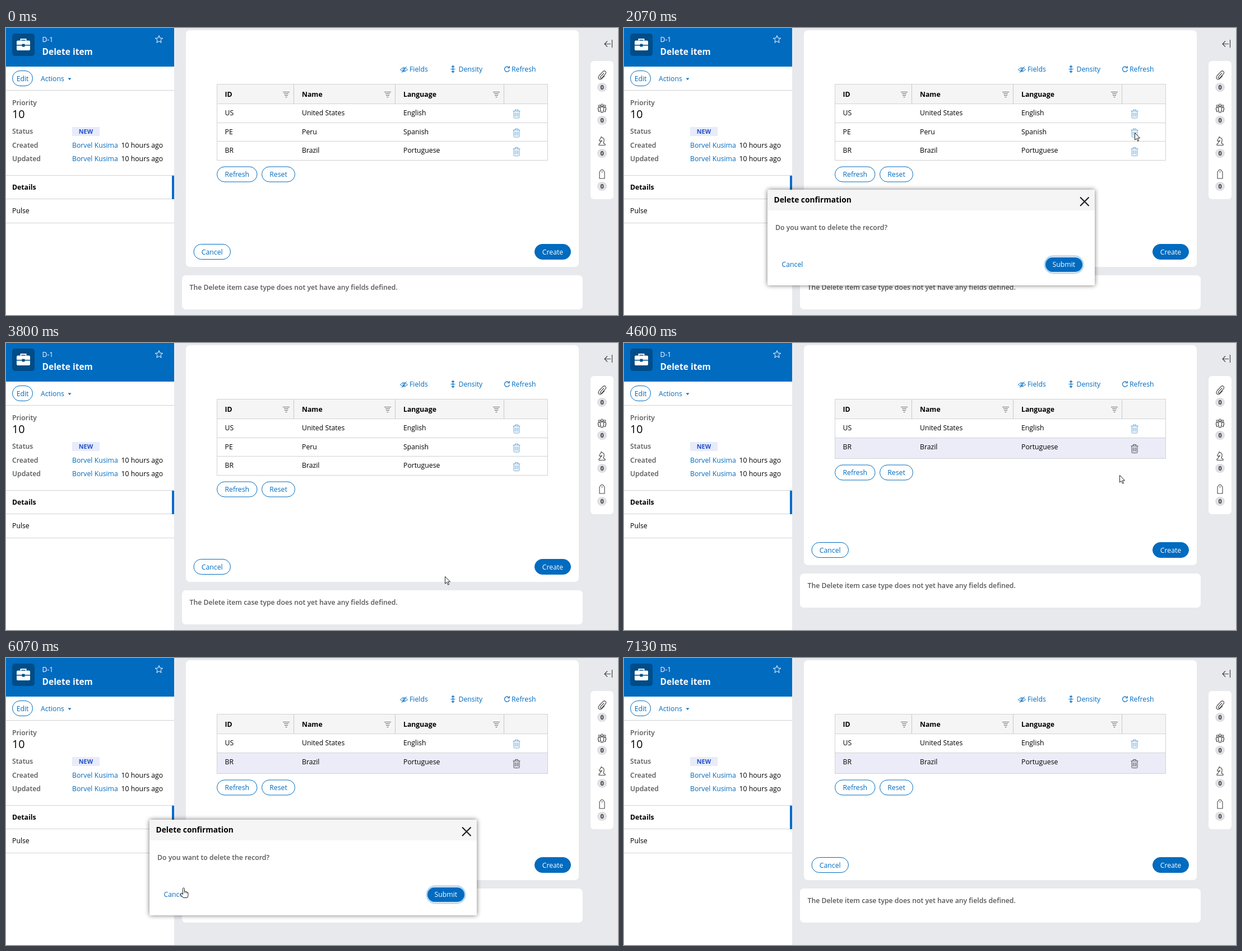
Recreate the animation shown at these times as an HTML page. Size 1092 by 513 pixels, loop 7590 ms.

```html
<!DOCTYPE html>
<html lang="en">
<head>
<meta charset="utf-8">
<title>Delete item</title>
<style>
  html, body { margin: 0; width: 100%; height: 100%; overflow: hidden; background: #e8e9ed; }
  svg { display: block; width: 100vw; height: 100vh; font: 12.25px "Open Sans", sans-serif; }
</style>
</head>
<body>
<svg id="stage" viewBox="0 0 1092 513"></svg>
<script>
const LOOP = 7590;
const BLUE = '#006bbf', INK = '#000', GREY = '#595959', LINE = '#d1d2d5';

// Drawing helpers
const text = (x, y, s, fill = INK, weight = 400, size = 12.25, anchor = 'start') =>
  `<text x="${x}" y="${y}" fill="${fill}" font-weight="${weight}" font-size="${size}" text-anchor="${anchor}">${s}</text>`;
const rect = (x, y, w, h, fill, r = 0, more = '') =>
  `<rect x="${x}" y="${y}" width="${w}" height="${h}" rx="${r}" fill="${fill}" ${more}/>`;
const line = (d, stroke, width = 1, more = '') =>
  `<path d="${d}" fill="none" stroke="${stroke}" stroke-width="${width}" ${more}/>`;
const group = (x, y, body, id = '') =>
  `<g ${id && `id="${id}"`} transform="translate(${x} ${y})">${body}</g>`;
const pill = (x, y, w, label, solid) =>
  rect(x + .5, y + .5, w - 1, 27, solid ? BLUE : '#fff', 13.5, `stroke="${BLUE}"`) +
  text(x + w / 2, y + 18.5, label, solid ? '#fff' : BLUE, 400, 12.25, 'middle');

const trash = (x, y, color) => group(x, y, line(
  'M-6.5 -5H6.5M-2.5 -5V-7.5H2.5V-5M-5 -5V6.2Q-5 7.5 -3.7 7.5H3.7Q5 7.5 5 6.2V-5M-2.5 -2.5V5M0 -2.5V5M2.5 -2.5V5', color));
const filter = x => line(`M${x - 6} 114.5h12M${x - 4} 117.5h8M${x - 3} 120.5h6M${x - 1.5} 123.5h3`, '#6b6b6b');

function sidebar() {
  const user = 'Borvel Kusima';
  const star = Array.from({ length: 10 }, (_, i) => {
    const a = i * Math.PI / 5, r = i % 2 ? 3.1 : 7;
    return `${(273 + r * Math.sin(a)).toFixed(1)} ${(20.5 - r * Math.cos(a)).toFixed(1)}`;
  }).join('L');
  return rect(0, 0, 300, 513, '#fff') + rect(0, 0, 300, 69, BLUE) +
    rect(11, 10, 40, 40, '#004c87', 5) +
    '<path d="M21 22.5H41Q43 22.5 43 24.5V30H33.5V28.5H28.5V30H19V24.5Q19 22.5 21 22.5ZM19 31.5H28.5V33.5H33.5V31.5H43V38Q43 40 41 40H21Q19 40 19 38Z" fill="#fff"/>' +
    line('M26.5 22.5V20H35.5V22.5', '#fff', 2) +
    text(64.5, 25, 'D-1', '#fff') + text(64.5, 48, 'Delete item', '#fff', 700, 15.5) +
    line(`M${star}Z`, '#fff', 1, 'stroke-linejoin="round"') +
    pill(11, 76, 37, 'Edit') + text(62, 95, 'Actions', BLUE) +
    `<path d="M110.5 89.5h6l-3 3.5z" fill="${BLUE}"/>` +
    line('M0 111.5H300M0 263.5H300M0 305.5H300M0 348.5H300', LINE) +
    text(11, 138, 'Priority', GREY, 600) + text(11, 161, '10', INK, 400, 19.6) +
    text(11, 189, 'Status', GREY, 600) + rect(118, 177, 49, 16, '#e7ebfa') +
    text(142.5, 189, 'NEW', '#2450c8', 700, 10.9, 'middle') +
    [['Created', 214], ['Updated', 238]].map(([label, y]) =>
      text(11, y, label, GREY, 600) + text(118, y, user, BLUE) + text(205.5, y, '10 hours ago')).join('') +
    text(11, 289, 'Details', INK, 700) + text(11, 331, 'Pulse') +
    rect(296, 264, 4, 42, '#076bc9');
}

function rail() {
  const ink = '#444';
  const icons = [
    'M3.5 -3.5L-2.5 2.8Q-4 4.8 -2.6 5.6Q-1.4 6.4 0 4.8L6 -1.8Q8.2 -4.8 6 -6.6Q3.8 -8.4 1.2 -5.6L-5 1Q-8 4.8 -5.2 7.2Q-2.6 9 0 6.2L4.5 1.5',
    'M-2 -5a2 2 0 1 0 4 0a2 2 0 1 0 -4 0M-6.5 -3.5a1.7 1.7 0 1 0 3.4 0a1.7 1.7 0 1 0 -3.4 0M3.1 -3.5a1.7 1.7 0 1 0 3.4 0a1.7 1.7 0 1 0 -3.4 0M-3 5V0Q-3 -2 0 -2Q3 -2 3 0V5H1.8V8H-1.8V5ZM-4 -.5H-7V3.5H-6V6.5H-3.5M4 -.5H7V3.5H6V6.5H3.5',
    'M-5.5 7.5V5.5L-3.5 4Q-3 1.5 0 -.8L-3.8 .5L-5 -1.2L-2 -5.5L-1.5 -7.5L.5 -6Q4.5 -4.5 3.5 0L2.5 4L5.5 5.5V7.5Z',
    'M-4.5 8V-3.5L-1.5 -7.5H1.5L4.5 -3.5V8ZM0 -5V-2.5'
  ];
  return line('M1081.5 21V35M1079 28.5H1068M1073 23.5L1068 28.5L1073 33.5', ink, 1.2) +
    rect(1043, 59, 41, 247, '#fff', 6) +
    icons.map((d, i) => group(1063.5, 84 + 59 * i, line(d, ink, 1.1, 'stroke-linejoin="round"') +
      rect(-8.5, 14, 17, 16, '#dedfe3', 8) +
      text(0, 26, '0', '#333', 700, 10.9, 'middle'))).join('');
}

const cells = (y, ...words) => words.map((w, i) => text([390.5, 528, 709][i], y, w)).join('');

function table() {
  const tools = line('M703.5 74.5Q710 67 716.5 74.5Q710 81 703.5 74.5ZM706 80L714.5 69', BLUE) +
    `<circle cx="710" cy="74.5" r="2" fill="none" stroke="${BLUE}"/>` +
    line('M797.5 67.5V79.5M795 70L797.5 67.5L800 70M795 77L797.5 79.5L800 77M793.5 73.5H801.5', BLUE, 1.1) +
    line('M897 70.2A4.5 4.5 0 1 0 898.5 74.5M898.3 68V71.5H894.8', BLUE, 1.2) +
    text(720, 78, 'Fields', BLUE) + text(807.5, 78, 'Density', BLUE) + text(902, 78, 'Refresh', BLUE);
  const heads = ['ID', 'Name', 'Language'].map((w, i) =>
    text([390.5, 528, 709][i], 122.5, w, INK, 700) + filter([500, 681, 875][i])).join('');
  return tools + rect(376, 100, 590, 35, '#f5f5f5') +
    line('M513.5 100V135M694.5 100V135M888.5 100V135', '#c6c7ca') + heads +
    cells(156, 'US', 'United States', 'English') + trash(911, 153.5, '#69a8da') +
    `<g id="full">${cells(189.5, 'PE', 'Peru', 'Spanish')}${trash(911, 187.5, '#69a8da')}
      ${cells(223, 'BR', 'Brazil', 'Portuguese')}${trash(911, 221, '#69a8da')}
      ${line('M376 202.5H966', LINE)}${rect(376.5, 100.5, 590, 136, 'none', 0, `stroke="${LINE}"`)}</g>` +
    `<g id="short">${rect(376, 169, 590, 37, '#ebecf7')}${cells(190, 'BR', 'Brazil', 'Portuguese')}
      ${trash(911, 189, '#4a4b52')}${rect(376.5, 100.5, 590, 106, 'none', 0, `stroke="${LINE}"`)}</g>` +
    line('M376 135.5H966M376 169.5H966', LINE);
}

function dialog() {
  const halo = (id, x, w) => `<g id="${id}">${rect(x - 1, 408, w + 2, 30, '#1b7fd6', 15, 'filter="url(#glow)"')}
    ${rect(x - .5, 408.5, w + 1, 29, '#fff', 14.5)}</g>`;
  return rect(256, 289, 584, 171, '#000', 2, 'opacity=".55" filter="url(#shade)"') +
    rect(256, 289, 584, 171, '#fff', 2) + rect(256, 289, 584, 37, '#f5f5f5', 2) +
    text(267.5, 312, 'Delete confirmation', INK, 700, 13.78) +
    line('M814 302.5L829.5 318M829.5 302.5L814 318', '#15161f', 2) +
    text(270, 361, 'Do you want to delete the record?', GREY, 600) +
    halo('cancelRing', 268, 65) + text(300.5, 427, 'Cancel', BLUE, 400, 12.25, 'middle') +
    halo('submitRing', 752, 66) + rect(752, 410, 66, 26, BLUE, 13) +
    text(784.8, 427, 'Submit', '#fff', 400, 12.25, 'middle');
}

const outline = 'fill="#fff" stroke="#222" stroke-width="1" stroke-linejoin="round"';
const arrow = `<path id="arrow" d="M.5 .5V13.2L3.4 10.6L5.7 15.3L7.6 14.4L5.4 9.8H9.6Z" ${outline}/>`;
const hand = `<g id="hand"><path d="M-1.5 7V-2.5Q-1.5 -4 0 -4T1.5 -2.5V2Q3.6 1.2 4 2.8Q5.8 2.2 6.2 3.8Q8 3.4 8 5.4V8.5Q8 11 6.5 13.5H-1L-5.3 7.6Q-6 6 -4.6 5.6Q-3.2 5.4 -1.5 7.5Z" ${outline}/>
  ${line('M1.5 2V5M4 2.8V5.5M6.2 3.8V6', '#222', .8)}</g>`;

const stage = document.getElementById('stage');
stage.innerHTML = `<defs>
  <filter id="glow" x="-20%" y="-40%" width="140%" height="180%"><feGaussianBlur stdDeviation="1.5"/></filter>
  <filter id="shade" x="-5%" y="-15%" width="110%" height="130%"><feGaussianBlur stdDeviation="4"/></filter>
  </defs>` +
  rect(0, 0, 1092, 513, '#e8e9ed') + sidebar() + rail() +
  rect(321, 4, 701, 380, '#fff', 7) +
  group(0, 0, rect(321, 340, 701, 87, '#fff', 7) + rect(314, 442, 715, 61, '#fff', 7) +
    pill(376, 247.5, 72.5, 'Refresh') + pill(456, 247.5, 60, 'Reset') +
    pill(334.5, 386, 66.5, 'Cancel') + pill(943, 386, 65, 'Create', true) +
    text(327.5, 468, 'The Delete item case type does not yet have any fields defined.', GREY, 600), 'below') +
  table() + `<g id="dialog">${dialog()}</g>` + group(0, 0, arrow + hand, 'cursor');

const el = id => document.getElementById(id);
const [below, full, short, box, cancelRing, submitRing, cursor, arrowEl, handEl] =
  ['below', 'full', 'short', 'dialog', 'cancelRing', 'submitRing', 'cursor', 'arrow', 'hand'].map(el);
const show = (node, on) => node.setAttribute('visibility', on ? 'inherit' : 'hidden');
const clamp = v => Math.max(0, Math.min(1, v));

// Pointer moves: start, duration, from, to
const moves = [
  [600, 1130, [1094, 520], [911, 187]],
  [2333, 1170, [911, 187], [783, 417]],
  [4133, 867, [783, 417], [911, 187]],
  [5150, 1070, [911, 187], [305, 420]],
  [6600, 1170, [305, 420], [-32, 553]]
];

function pointer(t) {
  const [start, span, a, b] = moves.filter(m => m[0] <= t).pop() || moves[0];
  const p = 1 - (1 - clamp((t - start) / span)) ** 2;
  return a.map((v, i) => v + (b[i] - v) * p);
}

const inside = (x, y, l, t, r, b) => x >= l && x <= r && y >= t && y <= b;

function render(ms) {
  const t = Math.round(Math.floor((ms + 4) * 15 / 1000) * 20 / 3) * 10;
  const first = t >= 2000 && t < 3600, second = t >= 5200 && t < 6470;
  const open = first || second, removed = t >= 3870;

  show(full, !removed);
  show(short, removed);
  below.setAttribute('transform', `translate(0 ${removed ? -30 : 0})`);

  show(box, open);
  const moved = clamp((t - 6130) / 130);
  submitRing.setAttribute('opacity', clamp((t - (first ? 1930 : 5130)) / 130) * (1 - moved));
  cancelRing.setAttribute('opacity', moved);

  const [x, y] = pointer(t);
  const link = open
    ? inside(x, y, 268, 409, 333, 437) || inside(x, y, 752, 409, 818, 437)
    : inside(x, y, 904, 179, 918, 198);
  show(cursor, t >= 670 && t < 7130);
  show(arrowEl, !link);
  show(handEl, link);
  cursor.setAttribute('transform', `translate(${Math.round(x)} ${Math.round(y)})`);
}

const begin = performance.now();
(function tick() {
  render((performance.now() - begin) % LOOP);
  requestAnimationFrame(tick);
})();
</script>
</body>
</html>
```
